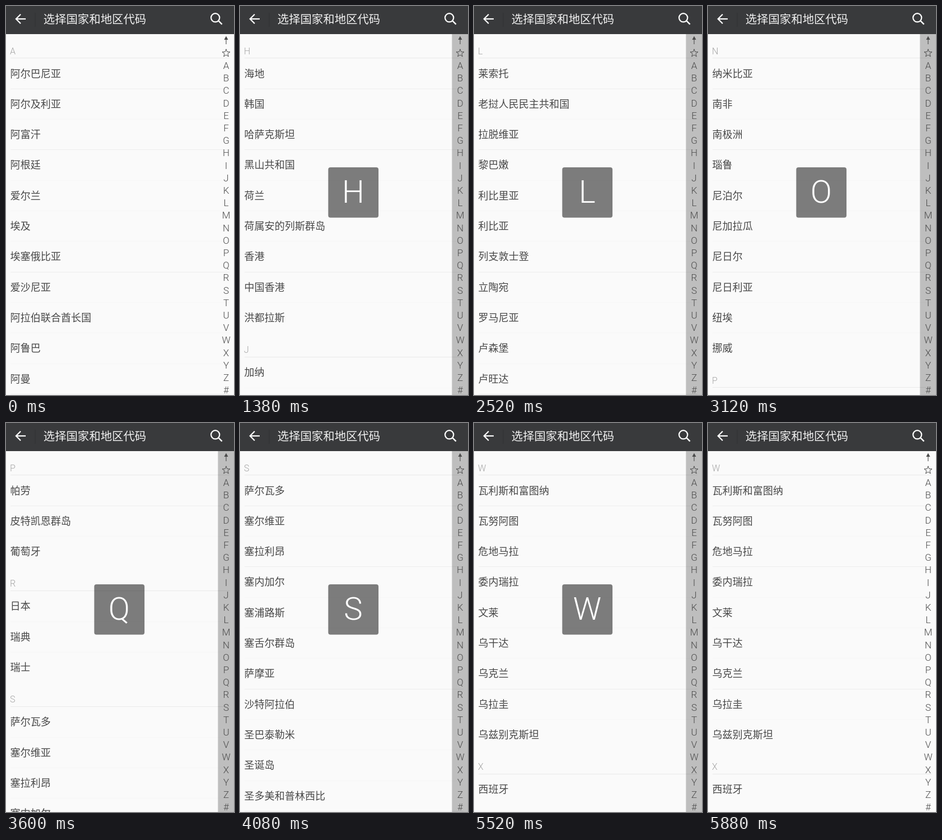
An HTML page with a canvas for the animation above (7140 ms loop, 405 by 692 pixels).

```html
<!DOCTYPE html>
<html lang="zh-CN">
<head>
<meta charset="utf-8">
<style>
  html, body { margin: 0; width: 100%; height: 100%; overflow: hidden; background: #fafafa; }
  canvas { display: block; }
</style>
</head>
<body>
<canvas id="stage" width="405" height="692"></canvas>
<script>
const ctx = document.getElementById('stage').getContext('2d');
const CJK = '"Noto Sans CJK SC", "Noto Sans CJK", sans-serif';
const LATIN = 'Roboto, sans-serif';
const LOOP = 7140, TOUCH_START = 1380, TOUCH_END = 5880;
const ROW = 54.3, HEADER = 43, LIST_TOP = 50;

const sections = {
  A: '阿尔巴尼亚 阿尔及利亚 阿富汗 阿根廷 爱尔兰 埃及 埃塞俄比亚 爱沙尼亚 阿拉伯联合酋长国 阿鲁巴 阿曼',
  H: '海地 韩国 哈萨克斯坦 黑山共和国 荷兰 荷属安的列斯群岛 香港 中国香港 洪都拉斯',
  J: '加纳 加拿大 柬埔寨 加蓬 吉布提 捷克共和国 吉尔吉斯斯坦 基里巴斯 津巴布韦 几内亚 几内亚比绍',
  K: '开曼群岛 喀麦隆 卡塔尔 科科斯群岛 克罗地亚 科摩罗 肯尼亚 科特迪瓦 科威特 库克群岛',
  L: '莱索托 老挝人民民主共和国 拉脱维亚 黎巴嫩 利比里亚 利比亚 列支敦士登 立陶宛 罗马尼亚 卢森堡 卢旺达',
  M: '马达加斯加 马尔代夫 马耳他 马拉维 马来西亚 马里 毛里求斯 毛里塔尼亚 马其顿 马绍尔群岛 马提尼克',
  N: '纳米比亚 南非 南极洲 瑙鲁 尼泊尔 尼加拉瓜 尼日尔 尼日利亚 纽埃 挪威',
  P: '帕劳 皮特凯恩群岛 葡萄牙',
  R: '日本 瑞典 瑞士',
  S: '萨尔瓦多 塞尔维亚 塞拉利昂 塞内加尔 塞浦路斯 塞舌尔群岛 萨摩亚 沙特阿拉伯 圣巴泰勒米 圣诞岛 圣多美和普林西比',
  T: '泰国 台湾 塔吉克斯坦 汤加 坦桑尼亚 特克斯和凯科斯群岛 特立尼达和多巴哥 土耳其 土库曼斯坦 突尼斯 托克劳',
  W: '瓦利斯和富图纳 瓦努阿图 危地马拉 委内瑞拉 文莱 乌干达 乌克兰 乌拉圭 乌兹别克斯坦',
  X: '西班牙'
};
const sectionKeys = Object.keys(sections);

// Time at which the finger reaches each index letter
const touches = {
  A: 0, H: 1380, I: 1500, J: 1920, K: 2220, L: 2520, M: 2640, N: 2880, O: 3120,
  P: 3360, Q: 3600, R: 3840, S: 4080, T: 4380, U: 4620, V: 4980, W: 5520
};

function text(str, x, y, font, color, align = 'left') {
  ctx.font = font;
  ctx.fillStyle = color;
  ctx.textAlign = align;
  ctx.fillText(str, x, y);
}

function line(points, color, width) {
  ctx.beginPath();
  points.forEach(([x, y]) => ctx.lineTo(x, y));
  ctx.strokeStyle = color;
  ctx.lineWidth = width;
  ctx.stroke();
}

function divider(y, color) {
  ctx.fillStyle = color;
  ctx.fillRect(8, Math.floor(y), 389, 1);
}

function drawList(letter) {
  const first = sectionKeys.filter(key => key <= letter).pop();
  let y = LIST_TOP;
  for (const key of sectionKeys.slice(sectionKeys.indexOf(first))) {
    if (y > 692) break;
    y += HEADER;
    text(key, 7, y - 7.5, `300 16px ${LATIN}`, '#a4a4a4');
    divider(y - .5, '#e9e9e9');
    sections[key].split(' ').forEach((name, i, names) => {
      text(name, 7.5, y + 33.5, `400 18px ${CJK}`, '#484848');
      y += ROW;
      const clear = y < 150 || Math.abs(y - 256) < 2 || Math.abs(y - 473) < 2 || y > 685;
      if (i < names.length - 1 || y > 685) divider(y, clear ? '#eeeeee' : '#f6f6f6');
    });
  }
}

function drawIndex(touched) {
  if (touched) {
    ctx.fillStyle = 'rgba(0,0,0,.24)';
    ctx.fillRect(376.5, 50, 28.5, 642);
  }
  const color = '#4c4c4c';
  line([[391, 68], [391, 56]], color, 1.1);
  ctx.beginPath();
  ctx.moveTo(391, 53.5);
  ctx.lineTo(394.5, 60);
  ctx.lineTo(387.5, 60);
  ctx.fillStyle = color;
  ctx.fill();

  const star = Array.from({ length: 11 }, (_, i) => {
    const r = i % 2 ? 3 : 7.3, a = i * Math.PI / 5;
    return [391 + r * Math.sin(a), 84 - r * Math.cos(a)];
  });
  line(star, color, 1);

  [...'ABCDEFGHIJKLMNOPQRSTUVWXYZ#'].forEach((c, i) =>
    text(c, 391, 112 + i * 22.2, `300 17px ${LATIN}`, color, 'center'));
}

function drawBubble(letter) {
  ctx.beginPath();
  ctx.roundRect(156.7, 287, 89.3, 89.5, 4);
  ctx.fillStyle = 'rgba(0,0,0,.5)';
  ctx.fill();
  text(letter, 201, 350, `300 56px ${LATIN}`, '#fff', 'center');
}

function drawBar() {
  ctx.fillStyle = '#393a3c';
  ctx.fillRect(0, 0, 405, 50);
  line([[52, 12], [52, 37]], '#303133', 1);
  line([[35, 23], [18, 23]], '#fff', 2.2);
  line([[26, 14.8], [17.8, 23], [26, 31.2]], '#fff', 2.2);
  text('选择国家和地区代码', 66.5, 30.5, `400 20.3px ${CJK}`, '#f2f2f2');
  ctx.beginPath();
  ctx.arc(371.8, 20.8, 7.6, 0, 2 * Math.PI);
  ctx.stroke();
  line([[377.2, 26.2], [383.7, 32.7]], '#fff', 2.4);
}

function draw(now) {
  const t = now % LOOP;
  const touched = t >= TOUCH_START && t < TOUCH_END;
  const letter = Object.keys(touches).filter(key => touches[key] <= t).pop();
  ctx.fillStyle = '#fafafa';
  ctx.fillRect(0, 0, 405, 692);
  drawList(letter);
  drawIndex(touched);
  if (touched) drawBubble(letter);
  drawBar();
  requestAnimationFrame(draw);
}
requestAnimationFrame(draw);
</script>
</body>
</html>
```
